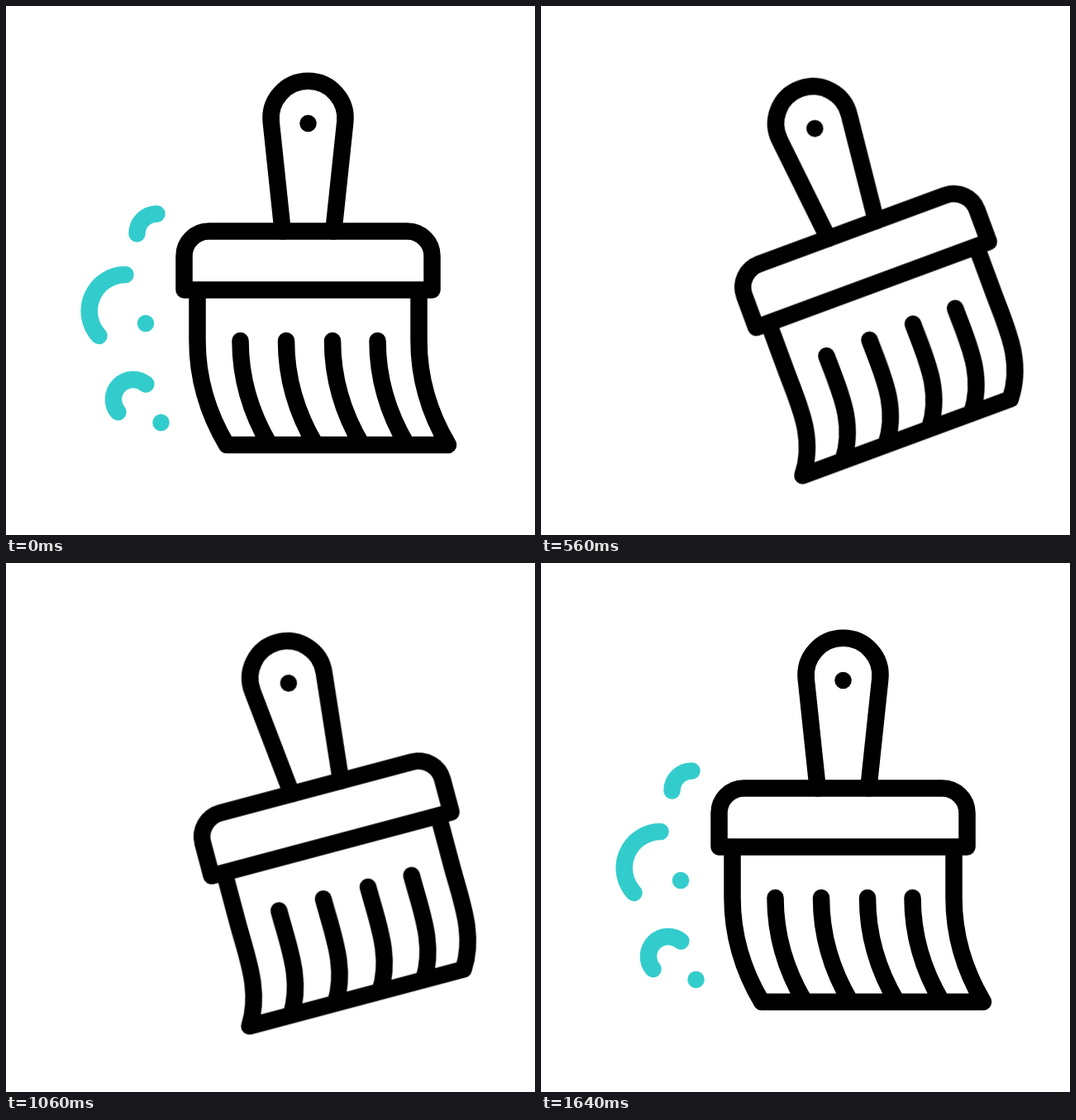
Write an HTML page that moves like this. It is 640x640 px and loops after 1.8 s.

```html
<!DOCTYPE html>
<html lang="en">
<head>
<meta charset="utf-8">
<title>Sweeping brush</title>
<style>
  html, body { margin: 0; width: 100%; height: 100%; overflow: hidden; background: #fff; }
  svg { display: block; width: 100%; height: 100%; }

  :root {
    --loop: 1800ms;
    --swing: cubic-bezier(.333, 0, .667, 1);
    --right: path("M231.5 344V405c0 45 13 88 35.5 126h268c-22.5 -38 -35.5 -81 -35.5 -126V344M283.5 405c0 45 13 88 35.5 126M339 405c0 45 13 88 35.5 126M395 405c0 45 13 88 35.5 126M449.5 405c0 45 13 88 35.5 126");
    --left: path("M231.5 344V405c0 45 4 88 -34 126h268c38 -38 34 -81 34 -126V344M283.5 405c0 45 4 88 -34 126M339 405c0 45 4 88 -34 126M395 405c0 45 4 88 -34 126M449.5 405c0 45 4 88 -34 126");
  }

  path { fill: none; stroke-width: 20.5; stroke-linecap: round; stroke-linejoin: round; }
  .brush { stroke: #000; transform-origin: 365.5px 241px; animation: sweep var(--loop) var(--swing) infinite; }
  .bristles { d: var(--right); animation: bend var(--loop) var(--swing) infinite; }
  .dust { stroke: #3cc; }

  @keyframes sweep {
    0%, 90%, 100% { transform: translateX(0) rotate(0deg); }
    27.5% { transform: translateX(7px) rotate(-27deg); }
    44.1% { transform: translateX(-48.7px) rotate(27deg); }
    65.5% { transform: translateX(16.4px) rotate(-27deg); animation-timing-function: cubic-bezier(.15, 0, .55, 1); }
  }
  @keyframes bend {
    0%, 44.1%, 90%, 100% { d: var(--right); }
    27.5% { d: var(--left); }
    65.5% { d: var(--left); animation-timing-function: cubic-bezier(.15, 0, .55, 1); }
  }
</style>
</head>
<body>
<svg viewBox="0 0 640 640">
  <g class="dust">
    <path d="M182.5 251.5a24 24 0 0 0 -24 24"/>
    <path d="M144.5 325a44 44 0 0 0 -32 74"/>
    <path d="M169.3 457.5a24 24 0 0 0 -33.8 33.8"/>
    <path d="M169 384h.01"/>
    <path d="M187.5 504h.01"/>
  </g>
  <g class="brush">
    <path d="M334.7 272.5L320.8 141A45 45 0 1 1 410.2 141L396.3 272.5"/>
    <path d="M365.5 142h.01"/>
    <path class="bristles"/>
    <path d="M215.5 343.5V302.5a30 30 0 0 1 30 -30H485.5a30 30 0 0 1 30 30V343.5Z"/>
  </g>
</svg>
<script>
  const LOOP = 1800, SETTLED = 1640;

  // When each speck has blown away, and when it starts to come back (ms).
  const specks = [
    { gone: 360, back: 1185 },
    { gone: 375, back: 1132 },
    { gone: 350, back: 1222 },
    { gone: 475, back: 1247 },
    { gone: 522, back: 1189 },
  ];

  const at = (ms) => `${(ms / LOOP * 100).toFixed(2)}%`;

  const speckRules = ({ gone, back }, i) => `
    @keyframes drift${i} {
      0%, ${at(SETTLED)}, 100% { transform: translate(0px, 0px); }
      ${at(gone)} { transform: translate(-64px, -45px); }
      ${at(back)} { transform: translate(70px, 40px); }
    }
    @keyframes fade${i} {
      0%, ${at(gone * 0.65)}, ${at(back + (SETTLED - back) * 0.31)}, 100% { opacity: 1; }
      ${at(gone)}, ${at(back)} { opacity: 0; }
    }
    .dust path:nth-child(${i + 1}) {
      animation: drift${i} var(--loop) var(--swing) infinite, fade${i} var(--loop) linear infinite;
    }`;

  const sheet = document.createElement("style");
  sheet.textContent = specks.map(speckRules).join("");
  document.head.append(sheet);
</script>
</body>
</html>
```
